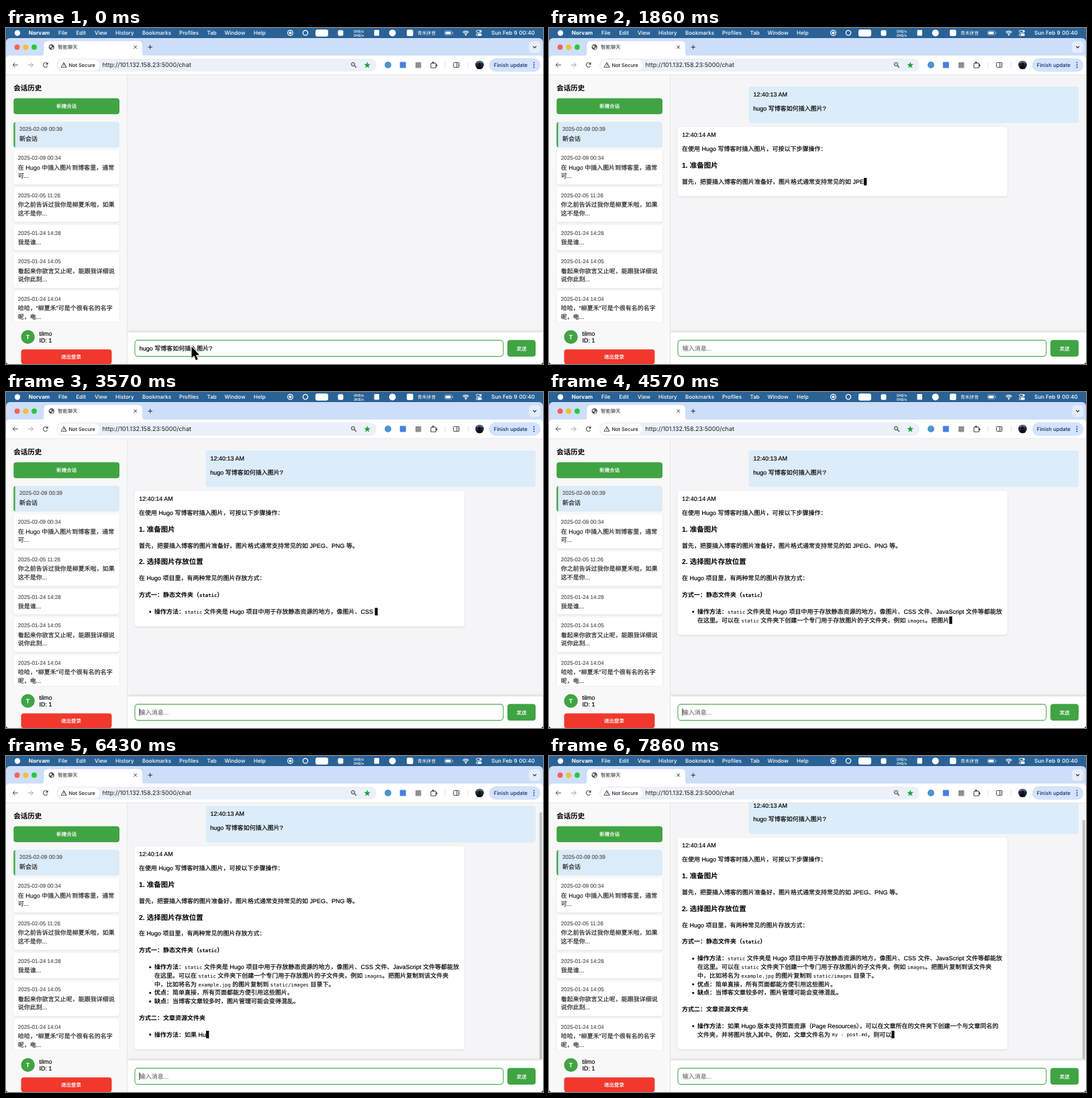
These frames come from a looping animation (800x500 px, 8 s). An HTML page with a canvas:

```html
<!DOCTYPE html>
<html lang="zh-CN">
<head>
<meta charset="utf-8">
<title>智能聊天</title>
<style>
html, body { margin: 0; width: 100%; height: 100%; overflow: hidden; background: #f5f5f7; }
canvas { display: block; width: 800px; height: 500px; }
</style>
</head>
<body>
<canvas id="stage"></canvas>
<script>
const canvas = document.getElementById('stage');
const ctx = canvas.getContext('2d');
const ratio = window.devicePixelRatio || 1;
canvas.width = 800 * ratio;
canvas.height = 500 * ratio;
ctx.scale(ratio, ratio);
ctx.textRendering = 'geometricPrecision';
ctx.lineJoin = 'round';

const CJK = '"Noto Sans CJK SC", "Noto Sans CJK", sans-serif';
const PAGE = '"Liberation Sans", ' + CJK;
const UI = 'Inter, ' + CJK;
const MONO = '"DejaVu Sans Mono", monospace';
const GREEN = '#40a443', BLUE = '#dcecf9', INK = '#1f1f1f', MENU = '#2a6296';
const LOOP = 8000, STEPS = 56;

// ---------- drawing helpers ----------
function rect(x, y, w, h, color, r = 0) {
  ctx.beginPath();
  ctx.roundRect(x, y, w, h, r);
  ctx.fillStyle = color;
  ctx.fill();
}

function frame(x, y, w, h, color, r = 0, width = 1) {
  ctx.beginPath();
  ctx.roundRect(x, y, w, h, r);
  ctx.strokeStyle = color;
  ctx.lineWidth = width;
  ctx.stroke();
}

function dot(x, y, r, color) {
  ctx.beginPath();
  ctx.arc(x, y, r, 0, Math.PI * 2);
  ctx.fillStyle = color;
  ctx.fill();
}

function ring(x, y, r, color, width = 1, from = 0, to = Math.PI * 2) {
  ctx.beginPath();
  ctx.arc(x, y, r, from, to);
  ctx.strokeStyle = color;
  ctx.lineWidth = width;
  ctx.stroke();
}

function line(points, color, width = 1) {
  ctx.beginPath();
  points.forEach(([x, y]) => ctx.lineTo(x, y));
  ctx.strokeStyle = color;
  ctx.lineWidth = width;
  ctx.stroke();
}

function shape(points, color) {
  ctx.beginPath();
  points.forEach(([x, y]) => ctx.lineTo(x, y));
  ctx.closePath();
  ctx.fillStyle = color;
  ctx.fill();
}

function clipTo(x, y, w, h, paint) {
  ctx.save();
  ctx.beginPath();
  ctx.rect(x, y, w, h);
  ctx.clip();
  paint();
  ctx.restore();
}

function shadow(color, blur, dy) {
  ctx.shadowColor = color;
  ctx.shadowBlur = blur * ratio;
  ctx.shadowOffsetY = dy * ratio;
}

function card(x, y, w, h) {
  ctx.save();
  shadow('rgba(0,0,0,.13)', 2.5, 0.8);
  rect(x, y, w, h, '#fff', 4);
  ctx.restore();
}

// y is the middle of the line
function text(str, x, y, size = 9, color = '#000', { weight = 400, family = PAGE, align = 'left' } = {}) {
  ctx.font = `${weight} ${size}px ${family}`;
  ctx.textAlign = align;
  ctx.fillStyle = color;
  const base = y + size * 0.365;
  ctx.fillText(str, x, base);
  if (family === PAGE && weight < 600) {
    // slightly fuller regular weight
    ctx.strokeStyle = color;
    ctx.lineWidth = 0.18;
    ctx.strokeText(str, x, base);
  }
  return ctx.measureText(str).width;
}

const label = (str, x, y) =>
  text(str, x, y, 7.5, '#fff', { weight: 500, align: 'center' });
const ui = (str, x, y, size, color, weight = 400) =>
  text(str, x, y, size, color, { weight, family: UI });

// ---------- reply: `code`, *bold*, | marks a timed point ----------
const KINDS = {
  p: { size: 9, weight: 400, pad: 22 },
  h3: { size: 10.53, weight: 700, pad: 24.4 },
  h4: { size: 9, weight: 700, pad: 25 },
  li: { size: 9, weight: 400, pad: 22.2 },
};

const reply = [
  ['p', 179.7, '在使用 Hugo 写博客时插入图片，可按以下步骤操作：'],
  ['h3', 204, '1|. 准备图片'],
  ['p', 228.5, '首先，把要插入博客的图片准备好，图片格式通常支持常见的如 JPEG、PNG 等。'],
  ['h3', 252.6, '2. 选择图片存放位置'],
  ['p', 277, '在 Hugo 项目里，有两种常见的图片存放方式：'],
  ['h4', 301.5, '方式|一：静态文件夹（`static`）'],
  ['li', 326.7, '*操作方法*：`static` 文件夹是 Hugo 项目中用于存放静态资源的地方，像图片、CSS 文件、JavaScript 文件等都能放', true],
  ['li', 339.4, '在这里。可以在 `static` 文件夹下创建一个专门用于存放图片的子文件夹，例如 `images`。把图片|复制到该文件夹'],
  ['li', 352.2, '中，比如将名为 `example.jpg` 的图片复制到 `static/images` 目录下。'],
  ['li', 365, '*优点*：简单直接，所有页面都能方便引用这些图片。 |', true],
  ['li', 377.7, '*缺点*：当博客文章较多时，图片管理可能会变得混乱。', true],
  ['h4', 402.4, '方式二：文章资源文件夹'],
  ['li', 427.1, '*操作方法*：如果 Hugo 版本支持页面资源（Page Resources），可以在文章所在的文件夹下创建一个与|文章同名的', true],
  ['li', 439.8, '文件夹，并将图片放入其中。例如，文章文件名为 `my - post.md`，则可以|'],
];

const START = 4;
const markSteps = [8, 19, 32, 40, 50, 55];
const keys = [[START, 0]];
let total = 0;
const lines = reply.map(([kind, y, source, bullet]) => {
  const plain = source.replace(/[`*]/g, '');
  const mark = plain.indexOf('|');
  if (mark >= 0) keys.push([markSteps[keys.length - 1], total + mark]);
  const runs = source.replace('|', '').split(/(`[^`]*`|\*[^*]*\*)/).filter(Boolean).map(part => ({
    str: part.replace(/[`*]/g, ''),
    code: part[0] === '`',
    bold: part[0] === '*',
  }));
  const length = plain.length - (mark >= 0 ? 1 : 0);
  const item = { kind, y, runs, bullet, from: total };
  total += length;
  return item;
});

function typedAt(step) {
  for (let i = 1; i < keys.length; i++) {
    const [a, from] = keys[i - 1], [b, to] = keys[i];
    if (step <= b) return Math.round(from + (to - from) * (step - a) / (b - a));
  }
  return total;
}

// A heading with only Latin letters has a lower line box
const lift = (item, typed) => item.kind === 'h3' && typed - item.from <= 3 ? 1.45 : 0;

function drawLine(item, typed, last) {
  const { size, weight } = KINDS[item.kind];
  const y = item.y - lift(item, typed);
  let x = item.kind === 'li' ? 221 : 198;
  let left = typed - item.from;
  if (item.bullet) dot(214.8, y + 0.3, 1.5, '#000');
  for (const run of item.runs) {
    if (left <= 0) break;
    const str = run.str.slice(0, left);
    const style = { weight: run.bold ? 700 : weight, family: run.code ? MONO : PAGE };
    x += run.code
      ? text(str, x, y + 0.5, size * 13 / 16, '#000', style)
      : text(str, x, y, size, '#000', style);
    left -= str.length;
  }
  if (last) rect(x + 0.1, y - size * 0.6, size * 0.47, size * 1.24, '#000');
}

function drawChat(step) {
  rect(180, 69, 620, 384, '#f5f5f7');
  if (step < 2) return;
  const typed = typedAt(step);
  const shown = lines.filter((item, i) => i === 0 || item.from < typed);
  const end = shown[shown.length - 1];
  const bottom = end.y + KINDS[end.kind].pad - 2 * lift(end, typed);
  const scroll = Math.max(0, bottom - 436.5);

  clipTo(181, 70, 619, 382, () => {
    ctx.translate(0, -scroll);
    rect(297.5, 87, 491.5, 54.5, BLUE, 4);
    text('12:40:13 AM', 304.5, 98.8);
    text('hugo 写博客如何插入图片?', 304.3, 119.3);
    if (step < START) return;
    card(191.5, 147, 491.5, bottom - 147);
    text('12:40:14 AM', 198.3, 158.7);
    shown.forEach(item => drawLine(item, typed, item === end));
  });

  if (scroll) {
    const h = 383 * 383 / (383 + scroll);
    rect(794.8, 454 - h, 3.8, h - 3, '#bfbfc1', 2);
  }
}

// ---------- page ----------
const history = [
  [181.5, 51.5, '2025-02-09 00:34', '在 Hugo 中插入图片到博客里，通常', '可...'],
  [237.3, 51.5, '2025-02-05 11:26', '你之前告诉过我你是柳夏禾啦，如果', '这不是你...'],
  [293, 38, '2025-01-24 14:28', '我是谁...'],
  [335.5, 51.5, '2025-01-24 14:05', '看起来你欲言又止呢，能跟我详细说', '说你此刻...'],
  [391.2, 51.5, '2025-01-24 14:04', '哈哈，“柳夏禾”可是个很有名的名字', '呢，电...'],
];

function drawSidebar() {
  rect(0, 69, 180, 431, '#f8f8f9');
  rect(180, 69, 0.8, 431, '#e2e2e4');
  text('会话历史', 11.3, 88.8, 10.53, '#000', { weight: 700 });
  rect(11.3, 104.5, 157.7, 23.7, GREEN, 4);
  label('新建会话', 90.2, 116.4);

  clipTo(0, 135, 180, 302.5, () => {
    rect(11.3, 139.5, 157.7, 38.5, '#dbebf8', 4);
    clipTo(11, 139, 2.6, 40, () => rect(11.3, 139.5, 157.7, 38.5, GREEN, 4));
    text('2025-02-09 00:39', 20, 150.4, 8.1, '#555');
    text('新会话', 20, 164.7, 9, '#222');
    for (const [y, h, date, ...rows] of history) {
      card(11.3, y, 157.7, h);
      text(date, 17.8, y + 11.6, 8.1, '#555');
      rows.forEach((row, i) => text(row, 17.8, y + 25.9 + i * 12.8, 9, '#222'));
    }
  });

  dot(32.6, 459.7, 10.2, GREEN);
  text('T', 32.6, 459.8, 9, '#fff', { weight: 700, align: 'center' });
  text('tilmo', 49.5, 454.3);
  text('ID: 1', 49.5, 464.6);
  rect(22.5, 478.3, 135, 21.9, '#f0382c', 4);
  label('退出登录', 97, 489.4);
}

function drawInput(step, time) {
  clipTo(180.8, 440, 620, 60, () => {
    shadow('rgba(0,0,0,.14)', 5, -1);
    rect(180.8, 453, 640, 60, '#fff');
  });
  frame(192, 464.6, 548.8, 24, '#4fae51', 4.5, 1.13);
  rect(747, 464.2, 42, 24.8, GREEN, 4);
  label('发送', 768, 476.8);

  if (step < 2) text('hugo 写博客如何插入图片?', 198.7, 476.6);
  else text('输入消息...', 198.7, 476.6, 9, '#757575');
  const phase = time % 1000;
  if (step >= 2 && phase >= 190 && phase < 690) rect(198.5, 471, 0.8, 11, '#000');
}

function drawPointer() {
  const arrow = [[276.5, 474], [276.5, 491], [280.2, 487.6], [283, 494.2], [285.8, 493], [283, 486.8], [288, 486.5], [276.5, 474]];
  line(arrow, '#fff', 2);
  shape(arrow, '#000');
}

// ---------- browser and menu bar ----------
function drawMenuBar(time) {
  const w = '#fff', faint = 'rgba(255,255,255,.6)';
  rect(0, 0, 800, 22, MENU);
  dot(17, 7.5, 4.2, w);
  ui('Norvam', 33.8, 7.2, 8.1, w, 700);
  [['File', 78], ['Edit', 104.5], ['View', 132], ['History', 163], ['Bookmarks', 203], ['Profiles', 258],
   ['Tab', 299.5], ['Window', 325.5], ['Help', 369]].forEach(([s, x]) => ui(s, x, 7.2, 8, w, 500));

  ring(423.5, 7.3, 3.9, w, 1.2);
  dot(423.5, 7.3, 2, w);
  ring(446, 7.3, 3.6, w, 1.3);
  rect(461, 2.3, 19, 10.4, w, 3);
  rect(494.5, 3.2, 8, 8.5, w, 2);
  const busy = time >= 2000 && time < 4000;
  ui(busy ? '4KB/s' : '0KB/s', 517.8, 4.8, 5.3, w, 500);
  ui(busy ? '3KB/s' : '0KB/s', 517.8, 10.8, 5.3, w, 500);
  rect(548.5, 3, 7.5, 8.5, w, 1);
  dot(575.7, 7.4, 5, w);
  rect(597, 2.5, 9.6, 9.6, w, 2);
  ui('青禾拼音', 613, 7.3, 6.8, w);
  frame(653.4, 4.2, 11.2, 6.2, faint, 1.8, 0.7);
  rect(654.6, 5.4, 8, 3.8, w, 1);
  rect(665.4, 6.2, 0.9, 2.2, faint);
  [1.9, 4.1, 6.3].forEach(r => ring(685, 11, r, w, 1.2, Math.PI * 1.25, Math.PI * 1.75));
  dot(685, 10.6, 0.9, w);
  frame(700.5, 3.5, 8, 3, w, 1.5, 0.8);
  dot(706.8, 5, 1.2, w);
  rect(700.1, 8, 8.8, 3.8, w, 1.9);
  dot(702, 9.9, 1.1, MENU);
  ui('Sun Feb 9', 723, 7.2, 8.1, w, 500);
  ui('00:40', 764.3, 7.2, 8.1, w, 500);
}

function drawTabs() {
  rect(0, 15, 800, 30, '#cddef9', [6, 6, 0, 0]);
  ['#fe5f57', '#febc2e', '#28c840'].forEach((c, i) => dot(16.6 + i * 12.7, 28.5, 3.9, c));
  ctx.beginPath();
  ctx.moveTo(51, 42);
  ctx.quadraticCurveTo(56.5, 42, 56.5, 36);
  ctx.lineTo(56.5, 25.5);
  ctx.quadraticCurveTo(56.5, 19.5, 62.5, 19.5);
  ctx.lineTo(197, 19.5);
  ctx.quadraticCurveTo(203, 19.5, 203, 25.5);
  ctx.lineTo(203, 36);
  ctx.quadraticCurveTo(203, 42, 208.5, 42);
  ctx.fillStyle = '#fff';
  ctx.fill();
  dot(67.8, 28.4, 4.2, '#55595e');
  shape([[64.6, 27], [67.5, 25.8], [68, 28.2], [66, 29.4]], '#fff');
  shape([[68.4, 29.4], [71, 28.5], [69.5, 31.4], [67.8, 31.6]], '#fff');
  ui('智能聊天', 77.3, 28.5, 7.3, INK);
  line([[190.5, 26.2], [194.9, 30.6]], INK, 0.9);
  line([[194.9, 26.2], [190.5, 30.6]], INK, 0.9);
  line([[211.6, 28.4], [218, 28.4]], INK, 0.9);
  line([[214.8, 25.2], [214.8, 31.6]], INK, 0.9);
  rect(779, 19.8, 17.3, 17.3, '#e4edfc', 5);
  line([[785.2, 27.2], [787.6, 29.6], [790, 27.2]], INK, 1.1);
}

function drawArrow(x, dir, color) {
  line([[x - 3.8 * dir, 55], [x + 3.8 * dir, 55]], color);
  line([[x + 0.5 * dir, 51.6], [x + 3.8 * dir, 55], [x + 0.5 * dir, 58.4]], color);
}

function drawToolbar() {
  const gray = '#474747', navy = '#10305f';
  rect(0, 41, 800, 28.5, '#fff', [5, 5, 0, 0]);
  rect(0, 69, 800, 0.7, '#dfe3ea');
  drawArrow(14, -1, gray);
  drawArrow(36.5, 1, '#a0a0a0');
  ring(58.8, 55, 3.3, gray, 1.1, 0.5, Math.PI * 1.8);
  shape([[62.6, 50.8], [62.6, 54.4], [59, 54.4]], gray);

  rect(75, 45.4, 477, 19.3, '#ebf0f9', 9.6);
  rect(77.2, 47.3, 61.8, 15.5, '#fff', 7.7);
  line([[86, 51.4], [90, 58.4], [82, 58.4], [86, 51.4], [90, 58.4]], gray, 0.9);
  rect(85.6, 53.8, 0.9, 2.2, gray);
  rect(85.6, 56.6, 0.9, 0.9, gray);
  ui('Not Secure', 93.5, 55, 7.4, INK, 500);
  ui('http://101.132.158.23:5000/chat', 143.5, 55, 9.05, INK);

  ring(517, 54, 2.7, gray, 1);
  line([[519, 56], [522, 59]], gray, 1.1);
  line([[515.7, 54], [518.3, 54]], gray, 0.7);
  const star = Array.from({ length: 10 }, (_, i) => {
    const r = i % 2 ? 2.1 : 5.1, a = i * Math.PI / 5 - Math.PI / 2;
    return [538.2 + r * Math.cos(a), 55.4 + r * Math.sin(a)];
  });
  shape(star, '#16a336');

  dot(569, 55, 5, '#4c94cc');
  rect(586.8, 50.5, 9, 9, '#4680e0', 1);
  rect(610, 51, 8.5, 8.5, '#8d9296', 1);
  frame(633, 52.2, 7.6, 7, gray, 1, 1.1);
  dot(636.2, 51.5, 1.5, gray);
  dot(641.2, 55.6, 1.5, gray);
  rect(653.7, 50.5, 0.8, 9, '#c6d8f5');
  frame(666.6, 51.4, 8.4, 7.2, gray, 1, 1);
  line([[671.2, 51.4], [671.2, 58.6]], gray, 0.9);
  [53.3, 55, 56.7].forEach(y => line([[672.4, y], [674, y]], gray, 0.7));
  rect(688.4, 50.5, 0.8, 9, '#c6d8f5');

  ctx.save();
  dot(705.5, 55, 6.3, '#1e2733');
  ctx.clip();
  rect(699, 48, 13, 4.5, '#53667a');
  dot(705.5, 53.5, 2.1, '#0a0e14');
  dot(705.5, 60, 4.3, '#0a0e14');
  ctx.restore();

  rect(719.8, 45, 76.4, 20.3, '#d3e3fd', 10);
  ui('Finish update', 726.8, 55, 7.8, navy, 500);
  [51.6, 55, 58.4].forEach(y => dot(786.5, y, 0.95, navy));
}

function drawCorners() {
  ctx.beginPath();
  for (const [x, dir] of [[0, 1], [800, -1]]) {
    ctx.moveTo(x, 496);
    ctx.quadraticCurveTo(x, 500, x + 4 * dir, 500);
    ctx.lineTo(x, 500);
    ctx.closePath();
  }
  ctx.fillStyle = '#111';
  ctx.fill();
}

function draw(now) {
  const time = now % LOOP;
  const step = Math.min(STEPS - 1, Math.floor((time + 5) * STEPS / LOOP));
  drawChat(step);
  drawSidebar();
  drawInput(step, time);
  drawMenuBar(time);
  drawTabs();
  drawToolbar();
  drawCorners();
  if (step < 2) drawPointer();
}

let origin;
function tick(now) {
  origin ??= now;
  draw(now - origin);
  requestAnimationFrame(tick);
}
draw(0);
requestAnimationFrame(tick);
</script>
</body>
</html>
```
